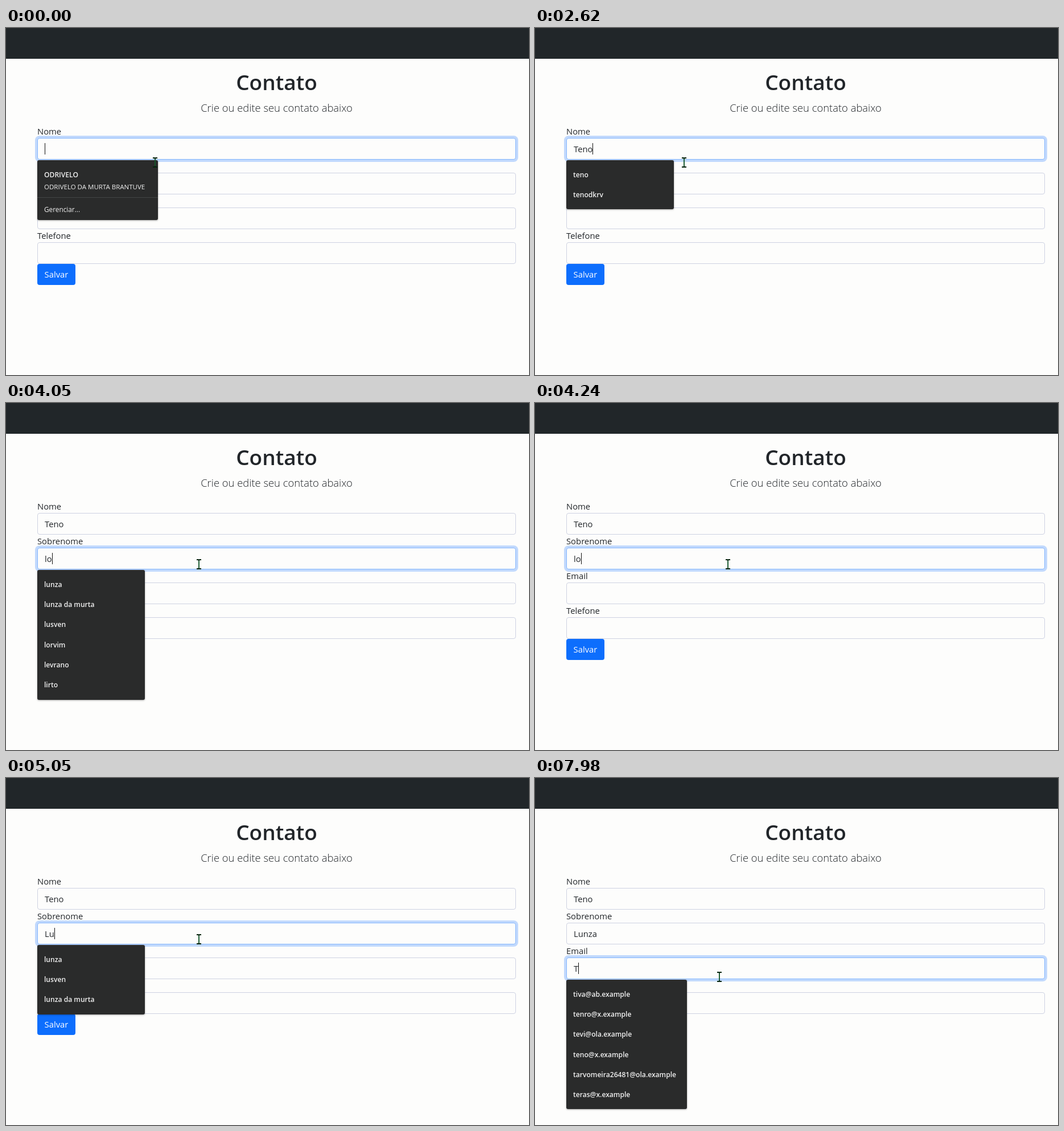
Animation of 919x609 px, one loop 8000 ms. Source, as an HTML page:

```html
<!DOCTYPE html>
<html lang="pt-BR">
<head>
<meta charset="utf-8">
<style>
  html, body { margin: 0; width: 100%; height: 100%; overflow: hidden; }
  body { position: relative; background: #fdfdfc; color: #212529; font: 14.8px/24px "Open Sans", "Noto Sans", sans-serif; }
  div, svg { position: absolute; box-sizing: border-box; white-space: pre; }
  .nav { left: 0; top: 0; width: 919px; height: 54px; background: #212629; }
  .title, .lead { left: 55px; width: 841px; text-align: center; }
  .title { top: 70.5px; font-size: 37px; font-weight: 600; line-height: 48px; }
  .lead { top: 128px; font-size: 18.4px; font-weight: 300; }
  .label { left: 55px; }
  .field { left: 55px; width: 841px; height: 38px; padding-left: 12px; display: flex; align-items: center; border: 1px solid; border-radius: 4px; background: #fdfdfc; }
  .caret { width: 1px; height: 20px; background: #111; }
  .save { left: 55px; top: 413.5px; width: 67px; height: 37.5px; border-radius: 4px; background: #0d6efd; color: #fff; text-align: center; line-height: 37px; }
  .menu { left: 55px; border-radius: 3px; background: #2a2b2b; color: #f1f1f1; box-shadow: 0 1px 3px #0005; }
  .menu div { left: 12px; line-height: 20px; font-size: 11.5px; }
  .menu .strong { font-size: 12.1px; font-weight: 600; }
  .menu .more { font-size: 11.8px; }
  .menu .rule { left: 0; width: 100%; height: 1px; background: #434545; }
</style>
</head>
<body>
<div class="nav"></div>
<div class="title">Contato</div>
<div class="lead">Crie ou edite seu contato abaixo</div>
<div class="save">Salvar</div>
<script>
const LOOP = 8000, FADE = 150, ROW = 60.9;
const fullName = "ODRIVELO DA MURTA BRANTUVE";

// Suggestion menus: people have a second line and a footer, words are single lines.
const people = (width, ...rows) => ({ width, rows, footer: true });
const words = (width, ...rows) => ({ width, rows: rows.map(row => [row]) });
const firstNames = ["teno", "tenodkrv", "tessol", "terivo", "tevani", "tuvel"];
const lastNames = ["lunza", "lunza da murta", "lusven", "lorvim", "levrano", "lirto"];
const first = count => words(189, ...firstNames.slice(0, count));
const last = count => words(189, ...lastNames.slice(0, count));
const lastThree = words(189, "lunza", "lusven", "lunza da murta");
const mails = words(212, "tiva@ab.example", "tenro@x.example", "tevi@ola.example",
  "teno@x.example", "tarvomeira26481@ola.example", "teras@x.example");

// [time, changes]; a change of text also shows the caret.
const steps = [
  [0, { field: 0, text: "", menu: people(212, ["ODRIVELO", fullName]) }],
  [290, { caret: false }],
  [770, { text: "T", menu: null }], [820, { menu: first(6) }],
  [970, { text: "Te", menu: null }], [1010, { menu: first(5) }],
  [1510, { caret: false }],
  [2090, { text: "Ten" }], [2140, { menu: null }], [2200, { menu: first(2) }],
  [2620, { text: "Teno" }],
  [3140, { field: 1, text: "", menu: null }],
  [3290, { menu: people(212, ["BRANTUVE", fullName]) }],
  [3670, { text: "l", menu: null }], [3720, { menu: last(6) }],
  [4050, { text: "lo" }], [4100, { menu: null }],
  [4450, { text: "l" }], [4500, { menu: last(6) }],
  [4600, { text: "", menu: null }],
  [4750, { text: "L" }], [4800, { menu: last(6) }],
  [4950, { text: "Lu" }], [5000, { menu: null }], [5050, { menu: lastThree }],
  [5210, { text: "Lun", menu: null }], [5260, { text: "Lunz", menu: last(2) }],
  [5410, { text: "Lunza" }],
  [5900, { field: 2, text: "", menu: null }],
  [6160, { menu: people(236, ["odrivelo_mbran@correio.example", fullName],
    ["odbrant58@carta.example", "Odrivelo da Murta Brantuve"]) }],
  [6430, { caret: false }], [6970, { caret: true }], [7580, { caret: false }],
  [7840, { text: "T" }], [7900, { menu: null }], [7980, { menu: mails }],
];
const focusTimes = [-FADE, 3140, 5900];
const moves = [[2720, 3140, 77, 47], [5700, 5900, -15, 66]];

function add(className, text = "", parent = document.body, top = 0) {
  const node = document.createElement("div");
  node.className = className;
  node.textContent = text;
  node.style.top = top + "px";
  parent.append(node);
  return node;
}

const fields = ["Nome", "Sobrenome", "Email", "Telefone"].map((label, i) => {
  add("label", label, document.body, 169.4 + i * ROW);
  const box = add("field", "", document.body, 193.3 + i * ROW);
  const text = document.createElement("span");
  const caret = document.createElement("span");
  caret.className = "caret";
  box.append(text, caret);
  return { box, text, caret };
});
const menuBox = add("menu");
document.body.insertAdjacentHTML("beforeend", `<svg id="mouse" width="12" height="20" fill="none">
  <path d="M2 2H5L6 3L7 2H10M6 3V17M2 18H5L6 17L7 18H10" stroke="#04260f" stroke-width="1.8"/>
  <path d="M6 4V16" stroke="#2c9a55" stroke-width=".8"/></svg>`);
const mouse = document.getElementById("mouse");

const clamp = x => Math.max(0, Math.min(1, x));
const ease = x => (x = clamp(x), x * x * (3 - 2 * x));
const mix = (a, b, k) => a.map((v, i) => v + (b[i] - v) * k);

let shownMenu;
function drawMenu(menu, field) {
  if (menu === shownMenu) return;
  shownMenu = menu;
  menuBox.hidden = !menu;
  menuBox.replaceChildren();
  if (!menu) return;
  const pitch = menu.footer ? 57 : 35.35;
  const end = menu.rows.length * pitch + 8;
  menu.rows.forEach(([strong, detail], i) => {
    add("strong", strong, menuBox, 15.5 + i * pitch);
    if (detail) add("", detail, menuBox, 36.5 + i * pitch);
  });
  if (menu.footer) {
    add("rule", "", menuBox, end);
    add("more", "Gerenciar...", menuBox, end + 10.5);
  }
  menuBox.style.top = 232.3 + field * ROW + "px";
  menuBox.style.width = menu.width + "px";
  menuBox.style.height = end + (menu.footer ? 40 : 7.3) + "px";
}

function draw(t) {
  const state = {}, texts = ["", "", "", ""];
  for (const [time, change] of steps) {
    if (time > t) break;
    Object.assign(state, "text" in change ? { caret: true } : {}, change);
    texts[state.field] = state.text;
  }
  fields.forEach(({ box, text, caret }, i) => {
    const since = n => ease((t - (focusTimes[n] ?? Infinity)) / FADE);
    const glow = since(i) - since(i + 1);
    box.style.borderColor = `rgb(${mix([206, 210, 226], [134, 183, 254], glow)})`;
    box.style.boxShadow = `0 0 0 ${4 * glow}px rgba(13,110,253,${0.25 * glow})`;
    text.textContent = texts[i];
    caret.style.visibility = i === state.field && state.caret ? "visible" : "hidden";
  });
  drawMenu(state.menu, state.field);

  let x = 262, y = 236;
  for (const [from, to, dx, dy] of moves) {
    const k = ease((t - from) / (to - from));
    x += dx * k;
    y += dy * k;
  }
  mouse.style.left = x - 6 + "px";
  mouse.style.top = y - 10 + "px";
}

const start = performance.now();
function tick() {
  draw((performance.now() - start) % LOOP);
  requestAnimationFrame(tick);
}
tick();
</script>
</body>
</html>
```
